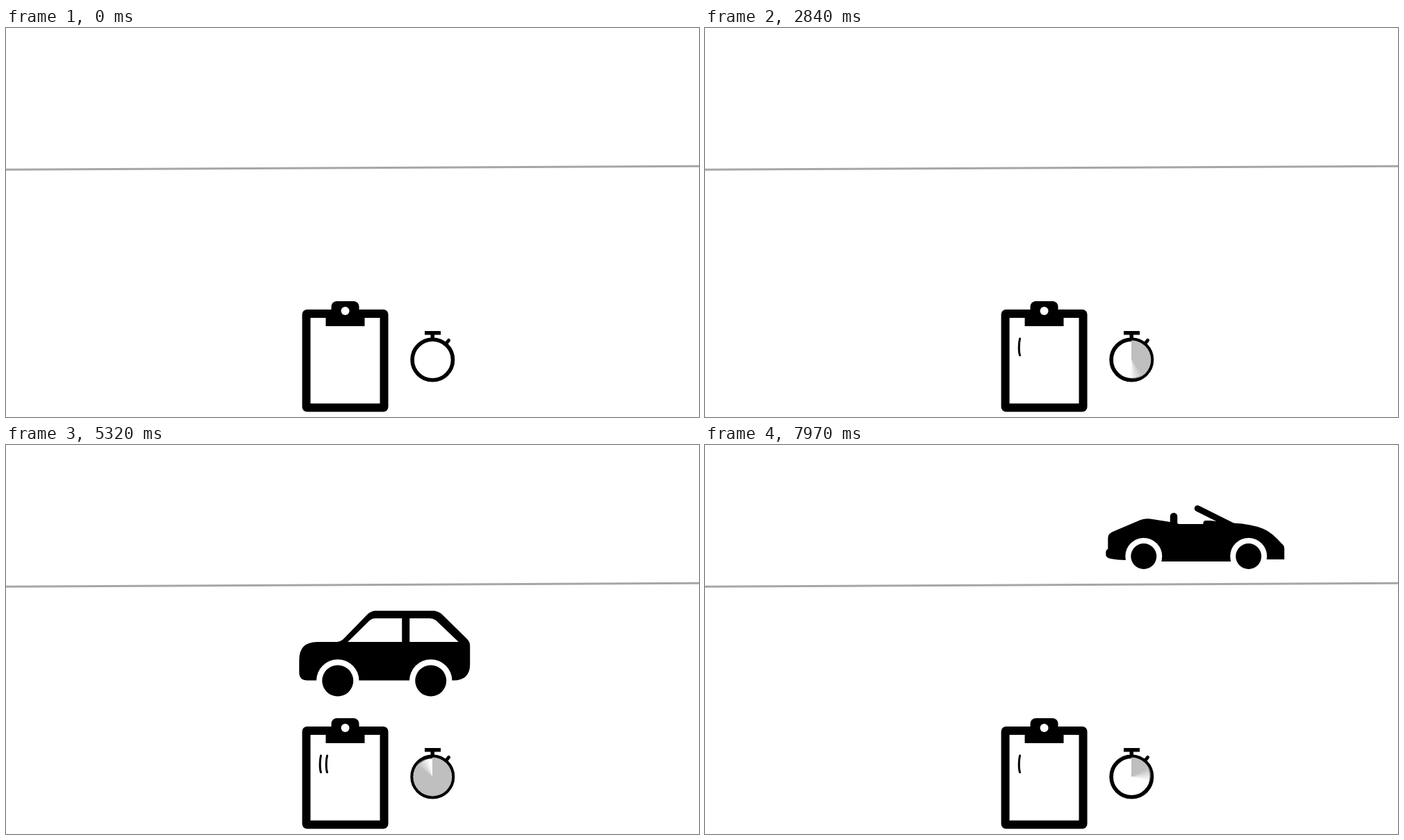
Animation, 998 px wide and 561 px high, one loop 8000 ms. Source, as an HTML page with a canvas:

```html
<!DOCTYPE html>
<html lang="en">
<head>
<meta charset="utf-8">
<title>Traffic count</title>
<style>
  html, body { margin: 0; width: 100%; height: 100%; overflow: hidden; background: #fff; }
  canvas { display: block; }
</style>
</head>
<body>
<canvas id="stage" width="998" height="561"></canvas>
<script>
const W = 998, H = 561, LOOP = 8000;
const STEP = 40, COUNT_END = 6160, RESTART = 6370;
const SPEED = 1.03;          // car speed, px per ms
const SWEEP = 0.066;         // stopwatch sweep, degrees per ms
const SOFT = 45;             // width of the soft sweep edge, degrees
const ctx = document.getElementById('stage').getContext('2d');

// Car shapes face left, with the nose at x = 0.
const hatchBody = new Path2D(
  'M0 71 Q0 45 26 45 H53 Q59 45 63.5 41 L98 5.5 Q103.500 0 111 0 H192 Q200 0 206 5.500 ' +
  'L242 41 Q246 45 246 51 V77 Q246 100.5 222 100.5 H12 Q0 100.5 0 89 Z ' +
  'M70 45 L101.5 14 Q105 11 110 11 H148 V45 Z ' +
  'M159 11 H188 Q193 11 197 14 L229.5 45 H159 Z');
const sportBody = new Path2D(
  'M25 78 H0 V62 Q0 58 4 55 Q18 39 30 34 Q46 27 74 25.5 L107 22 H113 Q117 22 117 27 H152 L154 26 ' +
  'V16 A5.25 5.25 0 0 1 164.5 16 V24 L193 19.5 Q201 18.5 207 21 L247 38 Q254 41 254 47 V63 ' +
  'Q257 64 257 68 V72 Q256 76 250 77 Q240 79 229 79 L176 81 H78 Z');
const sportLines = new Path2D(
  'M25 76.500 H4 V61 Q18 38 34 33.5 Q47 30 60.5 29.5 L90.5 25.5 L109 24 Q114 23.500 114 27 V30 H150.5 ' +
  'L193 22 Q198 21 204 23 Q230 31 248 39 Q252.5 41 252.5 46 L251.5 65 Q256 68 254 72 ' +
  'Q253 75 246 75.500 L229.5 76.5 M92 24.5 L137 1.5 M167.5 16 V25');

function disc(x, y, r, color) {
  ctx.fillStyle = color;
  ctx.beginPath();
  ctx.arc(x, y, r, 0, 2 * Math.PI);
  ctx.fill();
}

function ring(x, y, r, width) {
  ctx.lineWidth = width;
  ctx.beginPath();
  ctx.arc(x, y, r, 0, 2 * Math.PI);
  ctx.stroke();
}

function line(x1, y1, x2, y2, width, cap = 'butt') {
  ctx.lineWidth = width;
  ctx.lineCap = cap;
  ctx.beginPath();
  ctx.moveTo(x1, y1);
  ctx.lineTo(x2, y2);
  ctx.stroke();
}

function box(x, y, w, h, r, color) {
  ctx.fillStyle = color;
  ctx.beginPath();
  ctx.roundRect(x, y, w, h, r);
  ctx.fill();
}

function wheels(xs, y, arch, tyre) {
  for (const x of xs) {
    disc(x, y, arch, '#fff');
    disc(x, y, tyre, '#000');
  }
}

function hatchback() {
  ctx.fill(hatchBody, 'evenodd');
  wheels([55.5, 189.5], 101, 30.75, 22.5);
}

function convertible() {
  ctx.fill(sportBody);
  line(125, 4.5, 76, 29, 9, 'round');
  wheels([51.5, 202.5], 73.5, 26.5, 18.5);
}

function outlineCar() {
  ctx.lineWidth = 5.5;
  ctx.lineCap = ctx.lineJoin = 'round';
  ctx.stroke(sportLines);
  line(78, 79, 176.5, 79, 5);
  for (const x of [51.5, 202.5]) ring(x, 73.5, 18, 5);
}

const cars = [
  { draw: hatchback, start: 333, y: 58, dir: 1 },
  { draw: outlineCar, start: 2972, y: 266.5, dir: -1 },
  { draw: hatchback, start: 4761, y: 239, dir: -1 },
  { draw: convertible, start: 7160, y: 87, dir: 1 }
];
const tickTimes = [960, 3600, 5400, 7780];

function drawCar(car, t) {
  const run = SPEED * (t - car.start);
  if (run < 0 || run > W + 270) return;
  ctx.save();
  ctx.translate(car.dir > 0 ? run : W - run, car.y);
  ctx.scale(-car.dir, 1);
  ctx.fillStyle = ctx.strokeStyle = '#000';
  car.draw();
  ctx.restore();
}

function drawClipboard(ticks) {
  box(426.5, 406, 124, 147.5, 7, '#000');
  box(438.5, 418, 100, 123.5, 0, '#fff');
  box(460.5, 410, 56, 20, 0, '#000');
  box(468.5, 394, 40, 30, 8, '#000');
  disc(488.5, 408, 6, '#fff');
  ctx.strokeStyle = '#000';
  ctx.lineWidth = 3;
  ctx.lineCap = 'round';
  for (let i = 0; i < ticks; i++) {
    const x = 453.5 + i * 9;
    ctx.beginPath();
    ctx.moveTo(x, 448);
    ctx.bezierCurveTo(x - 1.5, 454, x - 2, 466, x, 472);
    ctx.stroke();
  }
}

function drawStopwatch(elapsed) {
  const x = 614.3, y = 478.5;
  box(603, 437, 23, 5.5, 0, '#000');
  box(611.5, 441, 5.5, 8, 0, '#000');
  ctx.strokeStyle = '#000';
  line(633, 456, 637.5, 450.5, 5, 'round');
  ring(x, y, 29.2, 5.6);

  const lead = elapsed * SWEEP;
  if (lead <= 0) return;
  const clamp = (v, max) => Math.min(max, Math.max(0, v));
  const sweep = ctx.createConicGradient(-Math.PI / 2, x, y);
  for (const deg of [0, lead - SOFT, lead, 360]) {
    const a = clamp(deg, 360);
    sweep.addColorStop(a / 360, `rgba(191,191,191,${clamp((lead - a) / SOFT, 1)})`);
  }
  disc(x, y, 28, sweep);
}

function snap(t) {
  if (t >= RESTART) return RESTART + Math.floor((t - RESTART) / STEP) * STEP;
  return Math.min(COUNT_END, Math.floor(t / STEP) * STEP);
}

function render(now) {
  const t = snap(now % LOOP);
  const begin = t >= RESTART ? RESTART : 0;
  ctx.fillStyle = '#fff';
  ctx.fillRect(0, 0, W, H);
  for (const car of cars) drawCar(car, t);
  ctx.strokeStyle = '#a6a6a6';
  line(-2, 204.3, W + 2, 199.3, 3);
  drawClipboard(tickTimes.filter(at => at >= begin && at <= t).length);
  drawStopwatch(t - begin);
}

let origin;
function loop(now) {
  origin ??= now;
  render(now - origin);
  requestAnimationFrame(loop);
}
render(0);
requestAnimationFrame(loop);
</script>
</body>
</html>
```
